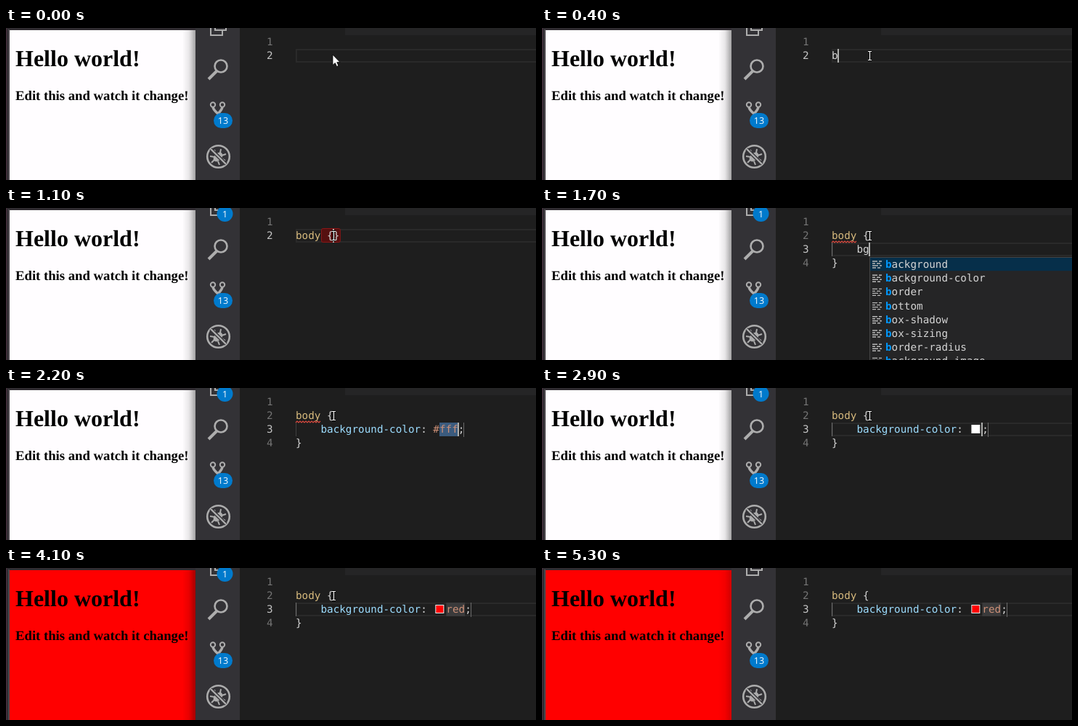
Write an HTML page with a canvas that moves like this. It is 730 px wide and 211 px high and loops after 5400 ms.

```html
<!DOCTYPE html>
<html lang="en">
<head>
<meta charset="utf-8">
<title>Live CSS editing</title>
<style>
  html, body { margin: 0; width: 100%; height: 100%; overflow: hidden; background: #1e1e1e; }
  canvas { display: block; }
</style>
</head>
<body>
<canvas id="stage" width="730" height="211"></canvas>
<script>
const ctx = document.getElementById('stage').getContext('2d');
const LOOP = 5400, LINE = 19.2, LEFT = 399;
const MONO = '14.3px "DejaVu Sans Mono", monospace';
const SERIF = '"Liberation Serif", serif';
const ICON = '#adadad', TEXT = '#d4d4d4', BLUE = '#007acc';

ctx.textRendering = 'geometricPrecision';
ctx.font = MONO;
const CHAR = ctx.measureText('0').width;

const tags = ['body', 'bdo', 'blockquote', 'button', '::before', '::-moz-broken',
  '::-ms-browse', '::-webkit-validation-bubble-text-block', '::backdrop'];
const props = ['background', 'background-color', 'border', 'bottom', 'box-shadow',
  'box-sizing', 'border-radius', 'background-image'];

// Each step changes part of the state from its time on.
const steps = [
  [0, { selector: '', pointer: 'arrow', shadow: .36 }],
  [100, { pointer: 'beam' }],
  [400, { selector: 'b', caret: true }],
  [500, { selector: 'bo', popup: { items: tags, query: 'b' } }],
  [600, { selector: 'bod', popup: { items: tags, query: 'bo' } }],
  [800, { selector: 'body', popup: { items: tags, query: 'bo' } }],
  [900, { badge: true, popup: { items: ['body'], query: 'body' } }],
  [1100, { braces: true, popup: null }],
  [1300, { braces: false, open: true, property: '' }],
  [1400, { squiggle: true }],
  [1600, { property: 'b' }],
  [1700, { property: 'bg', popup: { items: props, query: 'b' } }],
  [2100, { property: 'bgc', popup: { items: ['background-color: #fff;'], query: 'bgc' } }],
  [2200, { property: 'background-color', value: '#fff', selected: true, popup: null }],
  [2600, { swatch: '#fff' }],
  [2800, { value: '#', selected: false, squiggle: false }],
  [2900, { value: '' }],
  [3200, { value: 'r' }],
  [3300, { value: 're' }],
  [3600, { value: 'red' }],
  [3800, { swatch: '#f00' }],
  [4100, { page: '#f00', caret: false }],
  [4400, { pointer: null }],
  [4500, { badge: false }],
  [4600, { caret: true }],
  [5100, { caret: false }],
  [5300, { shadow: .18 }]
];

const stateAt = time =>
  Object.assign({}, ...steps.filter(([at]) => at <= time).map(([, change]) => change));

function rect(x, y, w, h, color) {
  ctx.fillStyle = color;
  ctx.fillRect(x, y, w, h);
}

function text(str, x, y, color = TEXT, font = MONO) {
  ctx.font = font;
  ctx.fillStyle = color;
  ctx.fillText(str, x, y);
  return x + ctx.measureText(str).width;
}

function stroke(d, color = ICON, width = 2) {
  ctx.strokeStyle = color;
  ctx.lineWidth = width;
  ctx.stroke(new Path2D(d));
}

function circle(x, y, r, width) {
  ctx.strokeStyle = ICON;
  ctx.lineWidth = width;
  ctx.beginPath();
  ctx.arc(x, y, r, 0, 7);
  ctx.stroke();
}

function pill(x, y, w, h, label) {
  ctx.fillStyle = BLUE;
  ctx.beginPath();
  ctx.roundRect(x, y, w, h, h / 2);
  ctx.fill();
  ctx.textAlign = 'center';
  text(label, x + w / 2, y + h / 2 + 4.5, '#fff', '12.5px "Open Sans", sans-serif');
  ctx.textAlign = 'left';
}

function drawPage(s) {
  rect(0, 0, 262, 211, '#302c31');
  rect(0, 0, 1, 211, '#49303f');
  rect(3, 2, 2, 209, '#4b474c');
  rect(5, 3, 256, 208, s.page || '#fffdff');
  const shade = ctx.createLinearGradient(243, 0, 261, 0);
  shade.addColorStop(0, 'rgba(0,0,0,0)');
  shade.addColorStop(.5, `rgba(0,0,0,${s.shadow * .25})`);
  shade.addColorStop(1, `rgba(0,0,0,${s.shadow})`);
  rect(243, 3, 18, 208, shade);
  text('Hello world!', 13, 53, '#000', 'bold 32px ' + SERIF);
  text('Edit this and watch it change!', 13, 100, '#000', 'bold 18.72px ' + SERIF);
}

function drawActivityBar(s) {
  rect(261, 0, 61, 211, '#333236');
  stroke('M282 0V10H298V4M288 0V3H303V0');
  circle(296, 53, 8.5, 2.6);
  stroke('M290 60L279 71', ICON, 4);
  circle(285, 106.5, 3.2, 2);
  circle(298, 106.5, 3.2, 2);
  stroke('M285 110Q286 114 292 119Q297 114 298 110', ICON, 3.4);
  pill(286, 118, 26, 21, '13');
  circle(292.5, 178.5, 15.3, 2.6);
  ctx.fillStyle = ICON;
  ctx.beginPath();
  ctx.ellipse(292, 179, 5, 7.5, Math.PI / 4, 0, 7);
  ctx.fill();
  stroke('M289 175L287 169M295 173L296 168M297 177L303 175M297 181L302 184M287 179L281 178M287 183L283 187M292 185L294 190', ICON, 2);
  stroke('M282 168L303 189', '#333236', 5);
  stroke('M282 168L303 189', ICON, 2.4);
  if (s.badge) pill(290.5, -3, 22, 22, '1');
}

function drawItemIcon(x, y, isPseudo) {
  if (isPseudo) {
    stroke(`M${x + 7} ${y - 6}l5.5 2.5v6.5l-5.5 3.5l-5.5 -3.5v-6.5zl0 0`, '#b180d7', 1.3);
    stroke(`M${x + 1.5} ${y - 3.5}l5.5 3l5.5 -3M${x + 7} ${y - .5}v7`, '#b180d7', 1.3);
  } else {
    stroke(`M${x} ${y - 4.5}h7m2 0h4M${x} ${y - 1.5}h4m2 0h5M${x} ${y + 1.5}h8m2 0h3M${x} ${y + 4.5}h5m2 0h4`, '#b8b8b8', 1.4);
  }
}

// Indexes of the letters of a label that match the query, from a word start on.
function matches(label, query) {
  if (!new RegExp('\\b' + [...query].join('.*?')).test(label)) return [];
  let at = label.search(new RegExp('\\b' + query[0])) - 1;
  return [...query].map(letter => at = label.indexOf(letter, at + 1));
}

function drawPopup({ items, query }, x, top) {
  const height = items.length * LINE + 1;
  rect(x, top, 730 - x, height, '#454545');
  rect(x + 1, top + 1, 729 - x, height - 2, '#252526');
  rect(x + 1, top + 1, 729 - x, LINE - 1, '#062f4a');
  items.forEach((label, i) => {
    const y = top + 15 + i * LINE;
    const hits = matches(label, query);
    drawItemIcon(x + 4, y - 4.5, label.startsWith('::'));
    let pen = x + 22;
    [...label].forEach((letter, j) => {
      const hit = hits.includes(j);
      pen = text(letter, pen, y, hit ? '#0097fb' : TEXT, (hit ? 'bold ' : '') + MONO);
    });
  });
}

function drawPointer(kind) {
  if (kind === 'arrow') {
    const arrow = new Path2D('M450 37V51.5L453.3 48.5L455.6 53.5L458 52.4L455.8 47.6H460Z');
    ctx.fillStyle = '#fff';
    ctx.fill(arrow);
    ctx.strokeStyle = '#000';
    ctx.lineWidth = .8;
    ctx.stroke(arrow);
  } else if (kind === 'beam') {
    const beam = 'M449 32.5H454M451.5 32V45M449 44.5H454';
    stroke(beam, '#000', 3);
    stroke(beam, '#fff', 1.2);
  }
}

function drawEditor(s) {
  rect(322, 0, 408, 211, '#1e1e1e');
  rect(467, 0, 263, 10, '#252526');

  const row = s.open ? 3 : 2;
  const top = 28.6 + (row - 2) * LINE;
  const baseline = n => 43 + (n - 2) * LINE;
  if (!s.selected) {
    ctx.strokeStyle = '#2a2a2a';
    ctx.lineWidth = 2;
    ctx.strokeRect(400, Math.round(top) + 1, 340, 17);
  }
  for (let n = 1; n <= (s.open ? 4 : 2); n++)
    text(String(n), 359, baseline(n), n === row ? '#c6c6c6' : '#747474');

  let caretX = LEFT + s.selector.length * CHAR;
  if (s.braces) {
    ctx.fillStyle = '#551010';
    ctx.strokeStyle = '#8b1717';
    ctx.lineWidth = 1;
    ctx.beginPath();
    ctx.roundRect(434.5, 28.5, 3 * CHAR, 19, 2);
    ctx.fill();
    ctx.stroke();
    text(' {}', caretX, 43);
    caretX += 2 * CHAR;
  }
  text(s.selector, LEFT, 43, s.selector === 'body' ? '#d7ba7d' : TEXT);

  if (s.open) {
    text(' {', caretX, 43);
    text('}', LEFT, baseline(4));
    rect(399, 48, 1, 19, s.selected ? '#404040' : '#707070');
    if (s.squiggle) stroke('M399 48' + 'l2 -2l2 2'.repeat(8) + 'l2 -2', '#e04a3f', 1.1);

    const full = s.value !== undefined;
    caretX = LEFT + 4 * CHAR;
    caretX = text(s.property, caretX, baseline(3), full ? '#9cdcfe' : TEXT);
    if (full) {
      caretX = text(': ', caretX, baseline(3));
      if (s.swatch) {
        rect(caretX + 3, 51, 12, 12, '#eee');
        rect(caretX + 4, 52, 10, 10, s.swatch);
        caretX += 18;
      }
      const width = s.value.length * CHAR;
      if (s.selected) rect(caretX + CHAR, 48, width - CHAR, 19, '#3b5b7e');
      else rect(caretX, 48, width, 19, '#3a3a3b');
      caretX = text(s.value, caretX, baseline(3), '#ce9178');
      text(';', caretX, baseline(3));
      rect(Math.round(caretX + CHAR) - 1, 48, 1, 20, '#6b6b6b');
    }
  }
  if (s.caret) rect(Math.round(caretX) - 1, Math.round(top), 2, 19, '#aeafad');
  if (s.popup) drawPopup(s.popup, Math.round(caretX), Math.round(top) + 20);
  drawPointer(s.pointer);
}

function frame(now) {
  const s = stateAt(now % LOOP);
  drawPage(s);
  drawActivityBar(s);
  drawEditor(s);
  requestAnimationFrame(frame);
}
const start = performance.now();
requestAnimationFrame(function first() {
  const loop = () => {
    const s = stateAt((performance.now() - start) % LOOP);
    drawPage(s);
    drawActivityBar(s);
    drawEditor(s);
    requestAnimationFrame(loop);
  };
  loop();
});
</script>
</body>
</html>
```
